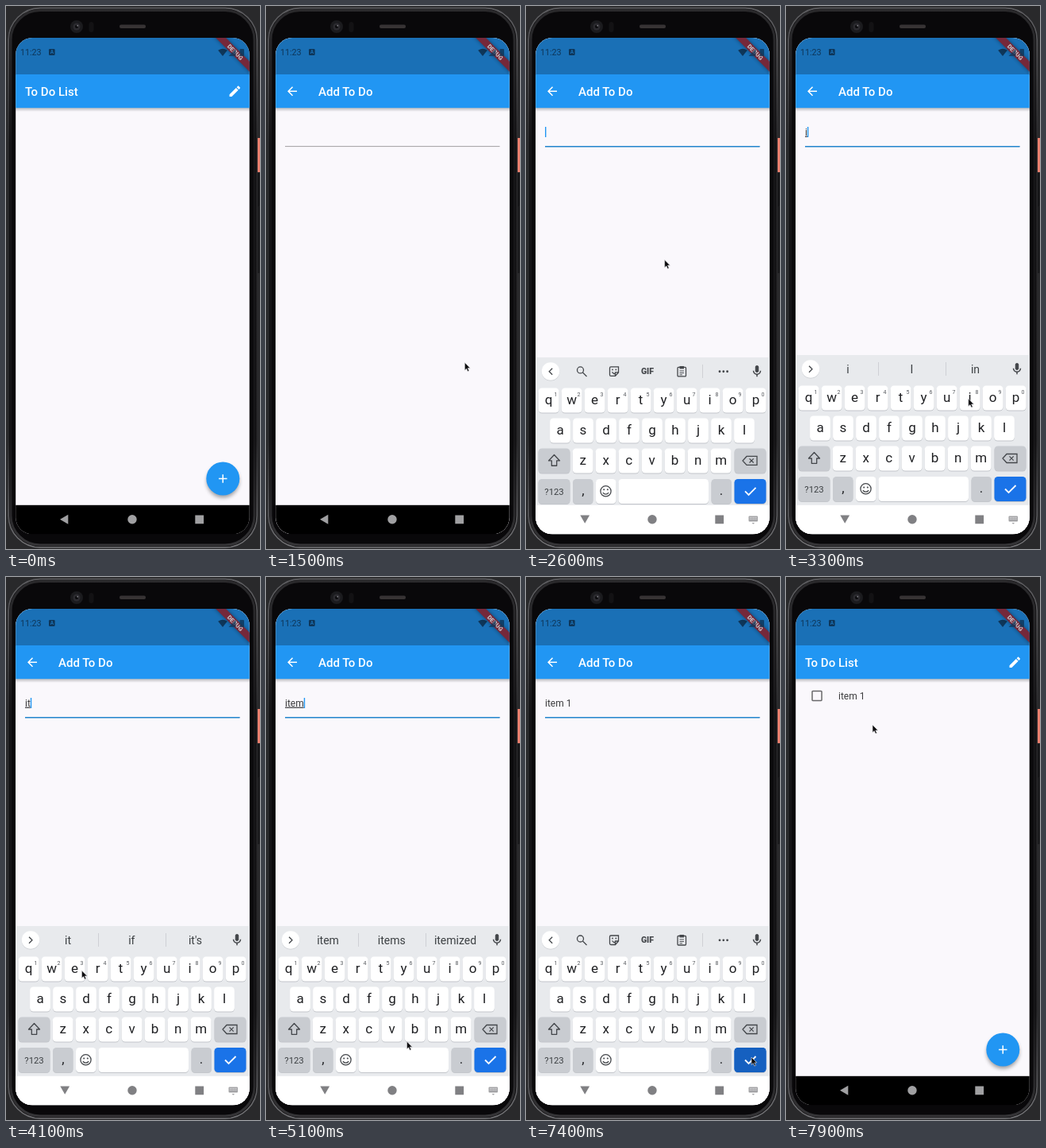
Write an HTML page that moves like this. It is 320x683 px and loops after 8000 ms.

```html
<!DOCTYPE html>
<html lang="en">
<head>
<meta charset="utf-8">
<title>To Do List</title>
<style>
html, body { margin: 0; width: 100%; height: 100%; overflow: hidden; background: #202022; }
svg { display: block; width: 100%; height: 100%; }
text { font-family: Roboto, sans-serif; white-space: pre; }
.mid { text-anchor: middle; }
.title { font-size: 15px; font-weight: 500; fill: #fff; }
.body { font-size: 12px; fill: #3c3c3e; }
.sug { font-size: 14px; fill: #3c4043; text-anchor: middle; }
.key { font-size: 17px; fill: #202124; text-anchor: middle; }
.num { font-size: 7px; fill: #55585d; text-anchor: middle; }
.line { fill: none; stroke: #44474b; stroke-width: 1.3; }
</style>
</head>
<body>
<svg id="stage" viewBox="0 0 320 683"></svg>
<script>
const LOOP = 8000;
const stage = document.getElementById('stage');
const $ = id => document.getElementById(id);

const rect = (x, y, w, h, fill, r = 0, more = '') =>
  `<rect x="${x}" y="${y}" width="${w}" height="${h}" rx="${r}" fill="${fill}" ${more}/>`;
const circle = (x, y, r, fill, more = '') =>
  `<circle cx="${x}" cy="${y}" r="${r}" fill="${fill}" ${more}/>`;
const text = (x, y, cls, str, more = '') =>
  `<text x="${x}" y="${y}" class="${cls}" ${more}>${str}</text>`;
const path = (d, more = '') => `<path d="${d}" ${more}/>`;
// 24-unit icon centred on a point
const icon = (x, y, d, fill) =>
  path(d, `fill="${fill}" transform="translate(${x - 9} ${y - 9}) scale(.75)"`);

const ICON = {
  edit: 'M3 17.25V21h3.75L17.81 9.94l-3.75-3.75L3 17.25zM20.71 7.04c.39-.39.39-1.02 0-1.41l-2.34-2.34c-.39-.39-1.02-.39-1.41 0l-1.83 1.83 3.75 3.75 1.83-1.83z',
  back: 'M20 11H7.83l5.59-5.59L12 4l-8 8 8 8 1.41-1.41L7.83 13H20v-2z',
  mic: 'M12 14c1.66 0 3-1.34 3-3V5c0-1.66-1.34-3-3-3S9 3.34 9 5v6c0 1.66 1.34 3 3 3zm5-3c0 2.76-2.24 5-5 5s-5-2.24-5-5H5c0 3.53 2.61 6.43 6 6.92V21h2v-3.08c3.39-.49 6-3.39 6-6.92h-2z'
};

const defs = `<defs>
  <linearGradient id="rim" x1="0" y1="0" x2="0" y2="1">
    <stop offset="0" stop-color="#5c5c5f"/><stop offset=".06" stop-color="#58585b"/>
    <stop offset=".25" stop-color="#29292b"/><stop offset=".8" stop-color="#29292b"/>
    <stop offset=".95" stop-color="#5e5e61"/><stop offset="1" stop-color="#77777a"/>
  </linearGradient>
  <linearGradient id="drop" x1="0" y1="0" x2="0" y2="1">
    <stop offset="0" stop-color="#000" stop-opacity=".25"/><stop offset="1" stop-color="#000" stop-opacity="0"/>
  </linearGradient>
  <filter id="soft" x="-50%" y="-50%" width="200%" height="200%"><feGaussianBlur stdDeviation="2.6"/></filter>
  <clipPath id="screen">${rect(12.2, 40, 294.5, 624.3, '#000', 21)}</clipPath>
</defs>`;

const phone = rect(0, 0, 320, 683, '#29292b')
  + rect(316.5, 210, 3, 42, '#151517', 1) + rect(316.5, 252, 3, 84, '#1b1b1d', 1)
  + rect(316.5, 166, 5, 43, '#e9806f', 1)
  + rect(3.2, 2.6, 313, 678.4, '#0a090b', 40, 'stroke="url(#rim)" stroke-width="1.6"')
  + rect(6, 5.6, 307, 672.4, '#09080a', 37, 'stroke="url(#rim)" stroke-width="3" stroke-opacity=".4"')
  + circle(89, 26, 8, '#1b1b1e') + circle(89, 26, 4.5, '#2c2b30') + circle(89, 26, 2, '#0b0b0d')
  + circle(90.2, 24.8, 1, '#77777c')
  + rect(104.5, 20, 6, 13, '#131214', 3)
  + rect(143, 23.5, 33, 4.5, '#373334', 2);

const page = content => rect(12, 40, 295, 624, '#faf8fc')
  + rect(12, 128, 295, 5, 'url(#drop)')
  + rect(12, 40, 295, 46.5, '#1a70b6') + rect(12, 86, 295, 42.2, '#2196f3') + content;

const listPage = page(
  text(24, 112.8, 'title', 'To Do List') + icon(288.3, 107.3, ICON.edit, '#fff')
  + `<g id="item">${rect(33, 143.4, 12, 12, 'none', 0.8, 'stroke="#68686a" stroke-width="1.5"')}${text(66, 153.5, 'body', 'item 1')}</g>`
  + circle(273.3, 598, 20.5, '#000', 'opacity=".36" filter="url(#soft)"')
  + circle(273.3, 594.5, 21, '#2196f3')
  + circle(273.3, 594.5, 21, '#fff', 'id="ripple"')
  + path('M268 594.5h10.5M273.25 589.250v10.5', 'stroke="#fff" stroke-width="1.5"'));

const addPage = page(
  icon(33, 107.3, ICON.back, '#fff') + text(66, 112.8, 'title', 'Add To Do')
  + rect(24, 176.2, 270.5, 0.9, '#98979a')
  + rect(24, 176, 270.5, 1.5, '#2387cf', 0, 'id="focus"')
  + text(24, 162.7, 'body', '', 'id="field"')
  + rect(24, 152, 1.4, 13, '#2196f3', 0, 'id="caret"'));

const ROWS = ['qwertyuiop', 'asdfghjkl', 'zxcvbnm'];
const ROW_X = [28.6, 43, 71.6], PITCH = 29;
const KEY_Y = [477.5, 515.5, 553.5, 592];
const keyAt = {};
const cap = (x, y, w, fill) => rect(x, y + 1, w, 31, '#c3c6cb', 4.5) + rect(x, y, w, 31, fill, 4.5);

const letters = ROWS.map((row, r) => [...row].map((ch, i) => {
  const x = ROW_X[r] + i * PITCH, y = KEY_Y[r];
  keyAt[ch] = [x, y];
  return cap(x - 12.9, y, 25.8, '#fff') + text(x, y + 20.7, 'key', ch)
    + (r ? '' : text(x + 8.8, y + 10.3, 'num', (i + 1) % 10));
}).join('')).join('');

const GREY = '#c9ccd1', BOTTOM = KEY_Y[3];
const specials = cap(15.5, KEY_Y[2], 40, GREY) + cap(262.5, KEY_Y[2], 40, GREY)
  + path('M35.5 561.5l-7 7.5h3.8v6.3h6.4v-6.3h3.8z', 'class="line" stroke-linejoin="round"')
  + path('M278 563.5h13v11h-13l-5-5.5zM281.5 566.4l5.2 5.2m0-5.2l-5.2 5.2', 'class="line"')
  + cap(15.5, BOTTOM, 40, GREY) + text(35.5, 611.8, 'mid', '?123', 'font-size="11.3" fill="#3c4043"')
  + cap(59, BOTTOM, 25.5, GREY) + text(72, 612, 'key', ',')
  + cap(88, BOTTOM, 25.5, '#fff') + cap(116.5, BOTTOM, 113.5, '#fff')
  + `<g class="line">${circle(100.5, 607.3, 6.6, 'none')}${path('M96.8 609.2q3.7 4 7.4 0')}</g>`
  + circle(98.2, 605.4, 1, '#44474b') + circle(102.8, 605.4, 1, '#44474b')
  + cap(233.5, BOTTOM, 25.5, GREY) + text(246, 612, 'key', '.')
  + cap(262.5, BOTTOM, 40, '#1a73e8') + rect(262.5, BOTTOM, 40, 31, '#1560c0', 4.5, 'id="pressed"')
  + path('M276 607.5l4.5 4.5l9-9', 'fill="none" stroke="#fff" stroke-width="1.8"');

const tools = `<g id="tools">${path('M33.2 452.8l-4 4l4 4', 'class="line"')}
  ${circle(68.5, 455, 4, 'none', 'class="line"')}${path('M71.5 458l5 5', 'class="line"')}
  ${path('M107 451h9.5v7l-4 4.5h-5.5q-1.5 0-1.5-1.5v-8.5q0-1.5 1.5-1.5M116.5 458h-4v4.5M108.5 457.5q2 3 4 1.5', 'class="line"')}
  ${circle(109, 454.5, 0.9, '#44474b')}${circle(113.3, 454.5, 0.9, '#44474b')}
  ${text(153, 460.3, 'mid', 'GIF', 'font-size="10.5" font-weight="900" fill="#44474b"')}
  ${rect(191, 451.5, 10.5, 11.5, 'none', 1, 'class="line"')}${rect(193.5, 450, 5.5, 3.4, '#44474b')}
  ${path('M193.5 456h5.5M193.5 458.5h5.5M193.5 460.8h3.5', 'class="line" style="stroke-width:.9"')}
  ${rect(222, 448, 0.8, 17, '#c8cacf')}
  ${[244, 248.8, 253.6].map(x => circle(x, 456.8, 1.4, '#44474b')).join('')}</g>`;

const hints = `<g id="hints">${path('M29 452.8l4 4l-4 4', 'class="line"')}
  ${rect(116, 448, 0.8, 17, '#c8cacf')}${rect(201, 448, 0.8, 17, '#c8cacf')}
  ${[78, 158.3, 238.5].map((x, i) => text(x, 462, 'sug', '', `id="sug${i}"`)).join('')}</g>`;

const bubble = `<g id="bubble">${rect(-14.5, -37, 29, 40, '#b9bcc2', 5)}
  ${rect(-14.5, -38, 29, 40, '#fff', 5, 'id="bubbleBack"')}${text(0, -11, 'key', '', 'id="bubbleText" style="font-size:21px"')}</g>`;

const keyboard = `<g id="keyboard">${rect(12, 439, 295, 226, '#e8eaed')}${circle(31, 457.3, 11.3, '#c9ccd1')}
  ${circle(31, 456.5, 11.3, '#fff')}${tools}${hints}${icon(291, 456.5, ICON.mic, '#44474b')}
  ${letters}${specials}${bubble}</g>`;

const nav = rect(12, 627.8, 295, 37, '#000', 0, 'id="navBack"')
  + `<g id="navIcons"><circle cx="159" cy="645.8" r="5.7"/>
  ${path('M238.3 640.5h10.8v10.8h-10.8z')}${path('M68 645.8l10.3-6v12z', 'id="navLeft"')}
  ${path('M68.3 640.5h11.8l-5.9 10.3z', 'id="navDown"')}</g>`
  + `<g id="navKeys">${rect(280.5, 641.5, 11.5, 7, '#a3a3a6', 1)}
  ${path('M282 643.5h9M282 645.3h9', 'stroke="#fff" stroke-width=".8" stroke-dasharray="1 .9"')}
  ${path('M284.5 650h3.6l-1.8 1.8z', 'fill="#a3a3a6"')}</g>`;

const INK = '#0e3659';
const status = text(18, 62.2, '', '11:23', `font-size="10.7" fill="${INK}"`)
  + rect(54, 54, 7.6, 8, INK, 1.2) + text(57.8, 60.4, 'mid', 'A', 'font-size="6.4" font-weight="700" fill="#1a70b6"')
  + path('M273 63l-5.8-7.2q5.8-4.3 11.6 0z', `fill="${INK}"`);
const ribbon = `<g transform="translate(306.7 40) rotate(45)">
  ${rect(-60, 21, 120, 9, '#000', 0, 'opacity=".4" filter="url(#soft)"')}${rect(-60, 21, 120, 9, '#75283a')}
  ${text(0, 28.2, 'mid', 'DEBUG', 'font-size="7.65" font-weight="900" fill="#c8c2c6"')}</g>`;
const power = path('M280.5 63h9v-9z', `fill="${INK}" opacity=".75"`)
  + rect(294.5, 54, 5.5, 9, INK, 1, 'opacity=".8"');

stage.innerHTML = defs + phone
  + `<g clip-path="url(#screen)"><g>${listPage}</g><g id="add">${addPage}</g>${keyboard}${nav}${status}${ribbon}${power}</g>`
  + path('M0 0v9.6l2.2-2l1.6 3.5l1.7-.8l-1.6-3.4h3z',
    'id="mouse" fill="#0c0c0e" stroke="#e6e6ea" stroke-width=".6"');

// time, x, y of the pointer tip
const MOUSE = [
  [280, 321, 560], [850, 274, 594], [1150, 273, 594], [1500, 250.5, 449], [2100, 168, 172],
  [2330, 167, 172], [2600, 174.5, 319], [3080, 230, 494], [3300, 230, 494], [3650, 145, 497],
  [3880, 145, 497], [4100, 95.5, 495], [4220, 87, 497], [4380, 87, 497], [4800, 245, 572],
  [4960, 245, 572], [5100, 177.5, 584], [5200, 173, 608], [5380, 173, 608], [5900, 48, 506],
  [6050, 30, 499], [6350, 30, 499], [6880, 284, 572], [7050, 284, 572], [7200, 284, 604],
  [7450, 284, 604], [7900, 109, 186], [8000, 109, 186]
];
// time, text, suggestions (none: toolbar)
const TYPED = [
  [0, '', null],
  [3250, 'i', ['i', 'I', 'in']],
  [3850, 'it', ['it', 'if', "it's"]],
  [4350, 'ite', ['ite', 'item', 'items']],
  [4930, 'item', ['item', 'items', 'itemized']],
  [5330, 'item ', ['is', 'and', 'in']],
  [6350, 'item 1', null]
];
const PRESSES = [['i', 3150, 3270], ['t', 3760, 3870], ['e', 4260, 4370], ['m', 4840, 4950], ['q', 6060, 6350]];
const FOCUS = 2350, DONE = 7350, POP = 7480;

const clamp = v => Math.max(0, Math.min(1, v));
const span = (t, a, b) => clamp((t - a) / (b - a));
const show = (id, on) => $(id).setAttribute('display', on ? 'inline' : 'none');
const set = (id, name, v) => $(id).setAttribute(name, v);
const move = (id, x, y) => set(id, 'transform', `translate(${x} ${y})`);

function drawMouse(t) {
  show('mouse', t >= MOUSE[0][0]);
  const i = MOUSE.findIndex(p => p[0] > t);
  if (i < 1) return;
  const [a, b] = [MOUSE[i - 1], MOUSE[i]], p = span(t, a[0], b[0]);
  move('mouse', a[1] + (b[1] - a[1]) * p, a[2] + (b[2] - a[2]) * p);
}

function drawPages(t) {
  const p = t < 4000 ? span(t, 1060, 1360) : 1 - span(t, POP, POP + 300);
  show('add', p > 0);
  set('add', 'opacity', p * p);
  move('add', 0, 156 * (1 - p) ** 3);
  show('item', t >= POP);
  set('ripple', 'opacity', 0.25 * Math.sin(Math.PI * span(t, 930, 1130)));
}

function drawField(t) {
  const [since, str, words] = TYPED.filter(e => e[0] <= t).pop();
  const field = $('field');
  field.textContent = str;
  field.style.textDecoration = words && !str.endsWith(' ') ? 'underline' : 'none';
  set('caret', 'x', 24 + (str ? field.getComputedTextLength() : 0));
  const blink = Math.floor((t - Math.max(since, FOCUS)) / 500) % 2 === 0;
  show('caret', t >= FOCUS && t < DONE && blink);
  set('focus', 'opacity', span(t, FOCUS, FOCUS + 150));
  show('tools', !words);
  show('hints', words);
  if (words) words.forEach((w, i) => { $('sug' + i).textContent = w; });
}

function drawKeyboard(t) {
  const out = span(t, POP, POP + 220);
  const shown = t >= 2400 && out < 1;
  show('keyboard', shown);
  move('keyboard', 0, 190 * (1 - span(t, 2400, 2700)) ** 3.75 + 225 * out * out);
  show('pressed', t >= 7300 && t < POP);
  set('navBack', 'fill', shown ? '#fff' : '#000');
  set('navIcons', 'fill', shown ? '#808083' : '#a0a0a2');
  show('navLeft', !shown);
  show('navDown', shown);
  show('navKeys', shown);

  const press = PRESSES.find(k => t >= k[1] && t < k[2]);
  show('bubble', press);
  if (!press) return;
  const held = press[0] === 'q' && t - press[1] > 110;
  move('bubble', ...keyAt[press[0]]);
  set('bubbleBack', 'fill', held ? '#1a73e8' : '#fff');
  $('bubbleText').style.fill = held ? '#fff' : '#202124';
  $('bubbleText').textContent = held ? '1' : press[0];
}

function draw(t) {
  drawPages(t);
  drawField(t);
  drawKeyboard(t);
  drawMouse(t);
}

const start = performance.now();
function tick() {
  draw((performance.now() - start) % LOOP);
  requestAnimationFrame(tick);
}
tick();
</script>
</body>
</html>
```
